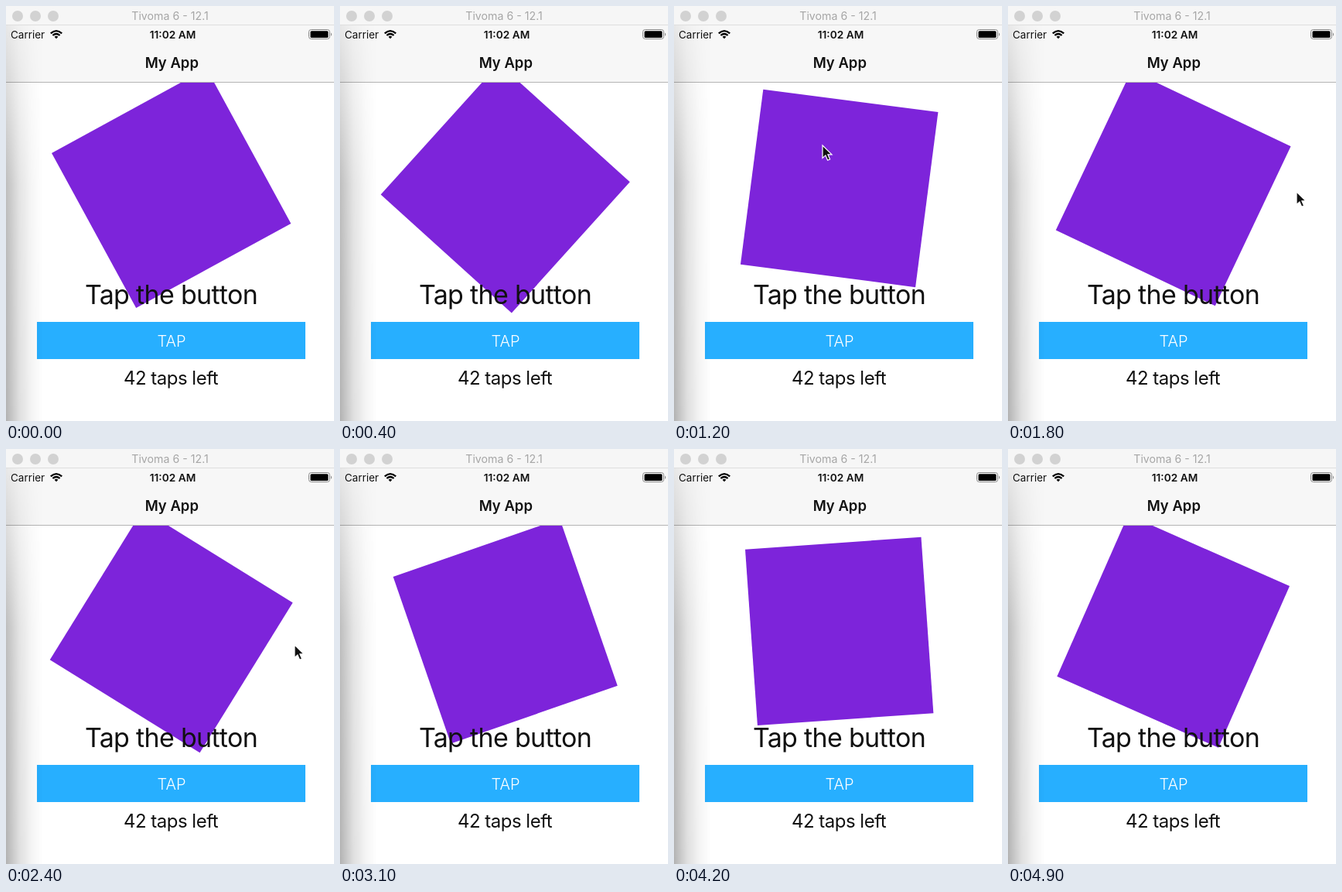
An HTML page that plays this animation: 424x536 px, repeating every 5 s.

```html
<!DOCTYPE html>
<html lang="en">
<head>
<meta charset="utf-8">
<title>My App</title>
<style>
  html, body { margin: 0; width: 100%; height: 100%; overflow: hidden; background: #fff; }
  svg { display: block; width: 424px; height: 536px; }
  text { font-family: Inter, Roboto, sans-serif; font-optical-sizing: none; fill: #111; }
  .mid { text-anchor: middle; }
  .semi { font-weight: 600; }
</style>
</head>
<body>
<svg viewBox="0 0 424 536">
  <defs>
    <linearGradient id="shade">
      <stop offset="0" stop-color="#000" stop-opacity=".3"/>
      <stop offset=".35" stop-color="#000" stop-opacity=".13"/>
      <stop offset=".7" stop-color="#000" stop-opacity=".04"/>
      <stop offset="1" stop-color="#000" stop-opacity="0"/>
    </linearGradient>
    <linearGradient id="fade" x2="0" y2="1">
      <stop offset="0" stop-color="#fff" stop-opacity=".2"/>
      <stop offset=".4" stop-color="#fff" stop-opacity=".85"/>
      <stop offset="1" stop-color="#fff"/>
    </linearGradient>
    <mask id="fall"><rect y="25" width="48" height="511" fill="url(#fade)"/></mask>
  </defs>

  <rect width="424" height="536" fill="#fff"/>
  <rect id="box" x="-114" y="-114" width="228" height="228" fill="#7d24da"/>

  <text class="mid" x="213.5" y="385" font-size="34" letter-spacing="-.7">Tap the button</text>
  <rect x="40" y="408" width="347" height="48" fill="#27afff"/>
  <text class="mid" x="214" y="439.5" font-size="20" font-weight="300" style="fill:#fff">TAP</text>
  <text class="mid" x="213" y="489" font-size="24" letter-spacing="-.5">42 taps left</text>

  <!-- header -->
  <rect width="424" height="98" fill="#f7f7f7"/>
  <rect y="98" width="424" height="1" fill="#b4b4b4"/>
  <rect width="424" height="24" fill="#f6f6f6"/>
  <rect y="24" width="424" height="1" fill="#dedede"/>
  <g fill="#d2d2d2">
    <circle cx="15" cy="13" r="7"/><circle cx="38" cy="13" r="7"/><circle cx="61" cy="13" r="7"/>
  </g>
  <text class="mid" x="212" y="18" font-size="14.2" style="fill:#a6a6a6">Tivoma 6 - 12.1</text>
  <text x="6" y="42" font-size="13.5">Carrier</text>
  <g fill="none" stroke="#000" stroke-width="2.3">
    <path d="M57.8 35.4Q65 28.8 72.2 35.4M60.4 38Q65 33.9 69.6 38"/>
    <path d="M65 42.2L62.6 39.8Q65 37.8 67.4 39.8Z" fill="#000" stroke="none"/>
  </g>
  <text class="mid semi" x="215.5" y="42" font-size="13.7">11:02 AM</text>
  <rect x="391.5" y="30.5" width="27" height="12" rx="3" fill="none" stroke="#888"/>
  <rect x="393.5" y="32.3" width="23" height="8.6" rx="1.5"/>
  <path d="M420 34.5Q422.4 36.7 420 39Z" fill="#888"/>
  <text class="mid semi" x="214.3" y="80" font-size="18.5">My App</text>

  <rect y="25" width="48" height="511" fill="url(#shade)" mask="url(#fall)"/>
  <path id="cursor" d="M0 0V16.5L3.9 12.9L6.6 19.3L9.6 18L6.9 11.8H12Z" fill="#111" stroke="#fff" stroke-width="1.2"/>
</svg>
<script>
  const LOOP = 5000, STEP = 100;

  // [ms, degrees]: an even spin with a short rest at each full turn
  const spin = [
    [0, -28.6], [400, 42.1], [1200, 187.4], [2159, 360], [2223, 360], [2400, 391.8],
    [3100, 520.9], [4200, 716], [4222, 720], [4268, 720], [4900, 833.8], [5000, 851.8]
  ];
  // [ms, x, y] of the pointer tip
  const path = [
    [1100, 168, 208], [1200, 192, 180], [1400, 270, 74], [1600, 340, 130],
    [1800, 373, 240], [2000, 350, 388], [2200, 366, 300], [2400, 373, 253], [2500, 373, 253]
  ];

  const box = document.getElementById("box");
  const cursor = document.getElementById("cursor");

  function at(keys, t, col = 1) {
    let i = 1;
    while (i < keys.length - 1 && keys[i][0] < t) i++;
    const a = keys[i - 1], b = keys[i];
    return a[col] + (b[col] - a[col]) * (t - a[0]) / (b[0] - a[0]);
  }

  function draw(now) {
    const t = Math.floor(now % LOOP / STEP) * STEP;
    box.setAttribute("transform", `translate(213.7 235.4) rotate(${at(spin, t)})`);
    const shown = t >= path[0][0] && t < path[path.length - 1][0];
    cursor.style.display = shown ? "" : "none";
    if (shown) cursor.setAttribute("transform", `translate(${at(path, t, 1)} ${at(path, t, 2)})`);
  }

  const start = performance.now();
  function tick() {
    draw(performance.now() - start);
    requestAnimationFrame(tick);
  }
  tick();
</script>
</body>
</html>
```
